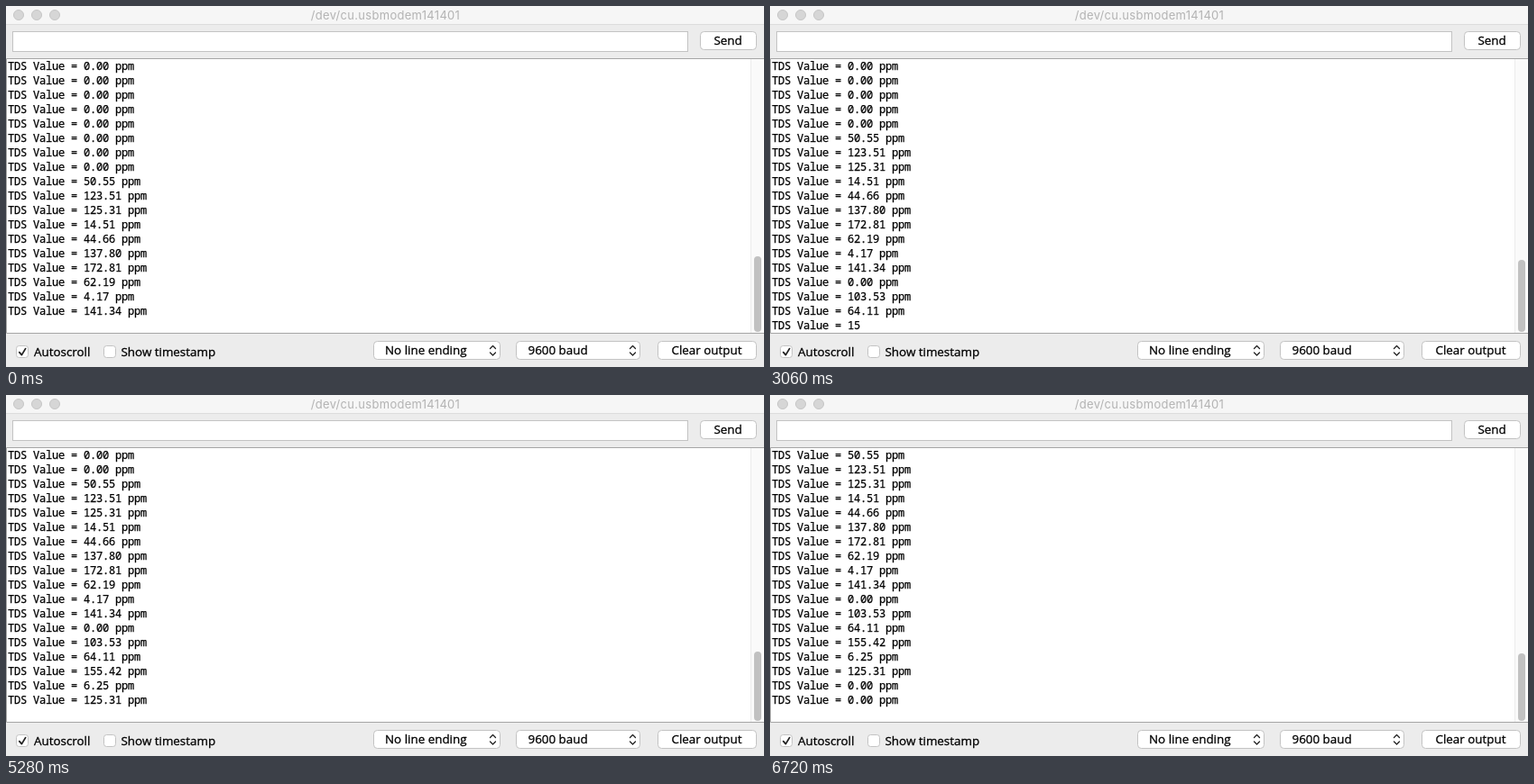
An HTML page for the animation above (6900 ms loop, 840 px wide and 401 px high).

```html
<!DOCTYPE html>
<html lang="en">
<head>
<meta charset="utf-8">
<title>Serial monitor</title>
<style>
  html, body { margin: 0; width: 100%; height: 100%; overflow: hidden; background: #ececec; }
  svg { display: block; }
  .title { font: 13px Inter, sans-serif; letter-spacing: .3px; fill: #b3b3b3; text-anchor: middle; }
  .ui text { font: 13.4px "Open Sans", sans-serif; stroke: #000; stroke-width: .3px; }
  .control { fill: #fff; stroke: #c3c3c3; }
  .mark { fill: none; stroke: #222; stroke-linecap: round; stroke-linejoin: round; }
  #log { font: 12px "Noto Sans Mono", monospace; letter-spacing: -.2px; stroke: #000; stroke-width: .25px; }
</style>
</head>
<body>
<svg width="840" height="401" viewBox="0 0 840 401">
  <defs>
    <path id="arrows" class="mark" stroke-width="1.3" d="M-3 -2l3-3l3 3M-3 2.5l3 3l3-3"/>
  </defs>
  <rect width="840" height="401" fill="#ececec"/>
  <rect width="840" height="20" fill="#f6f6f6"/>
  <path d="M0 20.5H840" stroke="#dcdcdc"/>
  <g fill="#d6d6d6" stroke="#c6c6c6">
    <circle cx="14" cy="10" r="5.5"/>
    <circle cx="34" cy="10" r="5.5"/>
    <circle cx="54" cy="10" r="5.5"/>
  </g>
  <text class="title" x="420.5" y="15">/dev/cu.usbmodem141401</text>

  <rect x="7.5" y="28.5" width="748" height="22" class="control"/>

  <rect y="58" width="840" height="306" fill="#fff"/>
  <rect x="825" y="59" width="14" height="304" fill="#fafafa"/>
  <path d="M825.5 59V363" stroke="#ebebeb"/>
  <path d="M840 58.5H.5V363.5H840" fill="none" stroke="#a5a5a5"/>
  <rect id="thumb" x="829" width="8" rx="4" fill="#c1c1c1"/>
  <g id="log"></g>

  <g class="ui">
    <rect x="769.5" y="28.5" width="62" height="20" rx="4" class="control"/>
    <text x="784.5" y="43">Send</text>

    <rect x="11.5" y="377.5" width="13" height="13" rx="3" class="control"/>
    <path class="mark" stroke-width="1.8" d="M14.8 384.6L17.4 387.6L21.6 380.6"/>
    <text x="31" y="389">Autoscroll</text>
    <rect x="108.5" y="377.5" width="13" height="13" rx="3" class="control"/>
    <text x="127.5" y="389">Show timestamp</text>

    <rect x="407.5" y="372.5" width="140" height="20" rx="4" class="control"/>
    <text x="420" y="387">No line ending</text>
    <use href="#arrows" x="539.5" y="382.5"/>
    <rect x="565.5" y="372.5" width="137" height="20" rx="4" class="control"/>
    <text x="578.5" y="387">9600 baud</text>
    <use href="#arrows" x="694.5" y="382.5"/>
    <rect x="722.5" y="372.5" width="109" height="20" rx="4" class="control"/>
    <text x="737.5" y="387">Clear output</text>
  </g>
</svg>
<script>
const LOOP = 6900, ROWS = 18, ROW_HEIGHT = 16;
const FIRST_LINE = 360, LINE_PERIOD = 900, REFRESH = 60;

const readings = "0.00 ".repeat(8) +
  "50.55 123.51 125.31 14.51 44.66 137.80 172.81 62.19 4.17 141.34 " +
  "0.00 103.53 64.11 155.42 6.25 125.31 0.00 0.00";
const lines = readings.split(" ").map(value => `TDS Value = ${value} ppm\n`);

// Characters of each new line that have arrived at its first refresh.
const received = [21, 0, 11, 14, 20, 8, 21, 20];

const log = document.getElementById("log");
const thumb = document.getElementById("thumb");
const rows = Array.from({ length: ROWS + 1 }, (_, i) => {
  const row = document.createElementNS("http://www.w3.org/2000/svg", "text");
  row.setAttribute("x", 2);
  row.setAttribute("y", 71 + i * ROW_HEIGHT);
  return log.appendChild(row);
});

function logAt(time) {
  const index = Math.floor((time - FIRST_LINE) / LINE_PERIOD);
  if (index < 0) return { scrolled: 0, partial: "" };
  const age = time - FIRST_LINE - index * LINE_PERIOD;
  const line = lines[ROWS + index];
  const text = age < REFRESH ? line.slice(0, received[index]) : line;
  return text === line
    ? { scrolled: index + 1, partial: "" }
    : { scrolled: index, partial: text };
}

function draw({ scrolled, partial }) {
  rows.forEach((row, i) => {
    row.textContent = i < ROWS ? lines[scrolled + i].trim() : partial;
  });

  // A full line lengthens the log just before the view scrolls down to it.
  const pending = partial.endsWith("ppm");
  const top = Math.round(278.4 + 1.1 * (scrolled + pending));
  thumb.setAttribute("y", top - (pending ? 4 : 0));
  thumb.setAttribute("height", 362 - top);
}

function frame() {
  draw(logAt(performance.now() % LOOP));
  requestAnimationFrame(frame);
}
frame();
</script>
</body>
</html>
```
